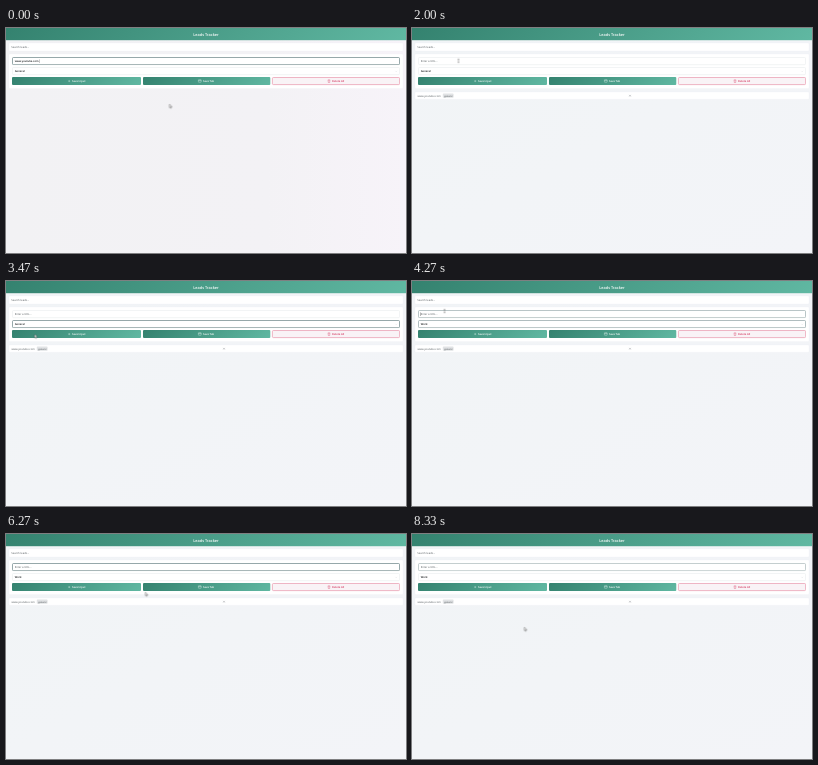
Write an HTML page that moves like this. It is 400 px wide and 225 px high and loops after 8.4 s.

```html
<!DOCTYPE html>
<html lang="en">
<head>
<meta charset="utf-8">
<title>Leads Tracker</title>
<style>
html, body { margin: 0; width: 100%; height: 100%; overflow: hidden; background: #f2f4f7; }
svg { display: block; width: 100%; height: 100%; }
text { font: 2.7px "Open Sans", "Noto Sans", sans-serif; fill: #43494d; text-rendering: geometricPrecision; }
.title { font-size: 3.85px; font-weight: 600; fill: #fff; text-anchor: middle; }
.hint { fill: #50575b; }
.value { font-size: 2.65px; font-weight: 600; fill: #14181a; }
.card { fill: #fff; stroke: #eceff1; stroke-width: .25; }
.field { fill: #fff; stroke: #dde2e5; stroke-width: .4; }
.focus { fill: none; stroke: #587578; stroke-width: .6; }
.btn text { font-size: 2.65px; font-weight: 600; fill: #fff; }
.btn path, .btn .icon { fill: none; stroke: #e9f8f3; stroke-width: .35; }
.del text { fill: #d2355d; }
.del path { stroke: #d2355d; }
.caret { stroke: #222; stroke-width: .35; }
.tip text { font-size: 2.25px; font-weight: 600; fill: #fff; text-anchor: middle; }

/* every timeline shares one loop */
.t { animation: 8.4s linear infinite; }
.step { animation-timing-function: step-end; }
.pink { animation-name: pink; }
.typed { animation-name: typed; }
.saved { animation-name: saved; }
.general { animation-name: general; }
.work { animation-name: work; }
.url-focus { animation-name: urlFocus; }
.cat-focus { animation-name: catFocus; }
.tip { animation-name: tip; }
.caret-end { animation-name: caretEnd; }
.caret-start { animation-name: caretStart; }
.arrow { animation-name: arrow; }
.hand { animation-name: hand; }
.beam { animation-name: beam; }
.cursor { animation-name: move; animation-timing-function: ease-in-out; }

@keyframes pink { 0%, 12% { opacity: 1 } 19%, 99.9% { opacity: 0 } 100% { opacity: 1 } }
@keyframes typed { 0% { opacity: 1 } 11.6%, 100% { opacity: 0 } }
@keyframes saved { 0% { opacity: 0 } 11.6%, 100% { opacity: 1 } }
@keyframes general { 0% { opacity: 1 } 44.8%, 100% { opacity: 0 } }
@keyframes work { 0% { opacity: 0 } 44.8%, 100% { opacity: 1 } }
@keyframes urlFocus {
  0%, 6% { opacity: 1 } 8.5%, 11% { opacity: .75 } 13%, 49% { opacity: 0 }
  52%, 95.5% { opacity: 1 } 99%, 99.9% { opacity: .5 } 100% { opacity: 1 }
}
@keyframes catFocus { 0%, 29.4% { opacity: 0 } 32.5%, 50% { opacity: 1 } 53%, 100% { opacity: 0 } }
@keyframes tip { 0%, 7% { opacity: 0 } 8.3%, 10.8% { opacity: 1 } 11.6%, 100% { opacity: 0 } }
@keyframes caretEnd { 0% { opacity: 1 } 6%, 100% { opacity: 0 } }
@keyframes caretStart { 0% { opacity: 0 } 50% { opacity: 1 } 55.6%, 100% { opacity: 0 } }
@keyframes arrow {
  0% { opacity: 1 } 6.7% { opacity: 0 } 12% { opacity: 1 } 23% { opacity: 0 }
  27% { opacity: 1 } 49.6% { opacity: 0 } 58% { opacity: 1 } 100% { opacity: 1 }
}
@keyframes hand { 0% { opacity: 0 } 6.7% { opacity: 1 } 12%, 100% { opacity: 0 } }
@keyframes beam {
  0% { opacity: 0 } 23% { opacity: 1 } 27% { opacity: 0 }
  49.6% { opacity: 1 } 58%, 100% { opacity: 0 }
}
@keyframes move {
  0%, .83% { transform: translate(163.4px, 76.3px) }
  8.4%, 11.1% { transform: translate(90.6px, 54.8px) }
  16.5%, 19% { transform: translate(88px, 99px) }
  23.8% { transform: translate(46.5px, 32.8px) }
  28.6%, 35.7% { transform: translate(42px, 43px) }
  41.3% { transform: translate(28.6px, 53.4px) }
  44.5%, 46.1% { transform: translate(27px, 58px) }
  50.8% { transform: translate(32.5px, 30px) }
  55.6%, 56.3% { transform: translate(34px, 33px) }
  65.8%, 69.9% { transform: translate(150px, 62px) }
  74.6% { transform: translate(139.3px, 58.3px) }
  77.7%, 82.5% { transform: translate(130px, 60px) }
  89.6%, 95.2% { transform: translate(125px, 64px) }
  99.17%, 99.99% { transform: translate(112.3px, 93.3px) }
  100% { transform: translate(163.4px, 76.3px) }
}
</style>
</head>
<body>
<svg viewBox="0 0 400 225" preserveAspectRatio="none">
  <defs>
    <linearGradient id="teal">
      <stop offset="0" stop-color="#34826f"/>
      <stop offset="1" stop-color="#60b8a2"/>
    </linearGradient>
    <!-- 45 degree sweeps across the bar and the buttons -->
    <linearGradient id="bar" href="#teal" gradientUnits="userSpaceOnUse" x1="97" y1="-97" x2="303" y2="109"/>
    <linearGradient id="fill" href="#teal" gradientUnits="userSpaceOnUse" x1="30.3" y1="-30.2" x2="98.7" y2="38.2"/>
    <linearGradient id="page" x2="1" y2="1">
      <stop offset="0" stop-color="#f1f4f6"/>
      <stop offset="1" stop-color="#f3f4f8"/>
    </linearGradient>
    <linearGradient id="blush">
      <stop offset="0" stop-color="#f2f2f4"/>
      <stop offset=".65" stop-color="#f3f2f5"/>
      <stop offset="1" stop-color="#f7f3f9"/>
    </linearGradient>
  </defs>

  <rect width="400" height="225" fill="url(#page)"/>
  <rect class="t pink" width="400" height="225" fill="url(#blush)"/>
  <rect width="400" height="12.2" fill="url(#bar)"/>
  <text class="title" x="200" y="7.7">Leads Tracker</text>

  <rect class="card" x="3" y="15" width="394" height="8" rx="1"/>
  <text class="hint" x="5.3" y="19.9">Search leads...</text>

  <rect class="card" x="3" y="26" width="394" height="34.5" rx="1"/>
  <rect class="field" x="6.5" y="29.5" width="387" height="7.2" rx="1"/>
  <rect class="field" x="6.5" y="39.5" width="387" height="7.2" rx="1"/>
  <rect class="focus t url-focus" x="6.5" y="29.5" width="387" height="7.2" rx="1"/>
  <rect class="focus t cat-focus" x="6.5" y="39.5" width="387" height="7.2" rx="1"/>

  <text class="value t step typed" x="8.7" y="34.1">www.youtube.com</text>
  <text class="hint t step saved" x="8.7" y="34.1">Enter a URL...</text>
  <path class="caret t step caret-end" d="M33.2 31.4v3.6"/>
  <path class="caret t step caret-start" d="M8.6 31.4v3.6"/>
  <text class="value t step general" x="8.7" y="44.2">General</text>
  <text class="value t step work" x="8.7" y="44.2">Work</text>
  <path d="M389.5 42.9l.7.7.7-.7" fill="none" stroke="#aeb4b8" stroke-width=".25"/>

  <g class="btn" transform="translate(6 49.1)">
    <rect width="129" height="7.9" rx="1" fill="url(#fill)"/>
    <path d="M56.2 4h2M57.2 3v2"/>
    <text x="60" y="4.9">Save Input</text>
  </g>
  <g class="btn" transform="translate(137 49.1)">
    <rect width="127.3" height="7.9" rx="1" fill="url(#fill)"/>
    <rect class="icon" x="55.4" y="2.6" width="2.8" height="2.5" rx=".3"/>
    <path d="M55.4 3.4h2.8"/>
    <text x="60" y="4.9">Save Tab</text>
  </g>
  <g class="btn del" transform="translate(266 49.1)">
    <rect x=".4" y=".4" width="127.2" height="7.1" rx="1" fill="#f9f3f6" stroke="#e0718d" stroke-width=".5"/>
    <path d="M55.8 3h2.4M56.1 3.1l.2 2.3h1.4l.2-2.3M56.6 2.6h.8"/>
    <text x="60" y="4.9">Delete All</text>
  </g>

  <g class="t step saved">
    <rect class="card" x="3" y="64" width="394" height="7.3" rx="1"/>
    <text x="5.4" y="68.7" class="hint">www.youtube.com</text>
    <rect x="30.8" y="65.6" width="10.8" height="4.2" rx=".8" fill="#e1e3e5"/>
    <text x="36.2" y="68.5" text-anchor="middle" style="font-size:2.35px">general</text>
    <path d="M217.2 66.9l1.6 1.6m0-1.6l-1.6 1.6" stroke="#6c7175" stroke-width=".35"/>
  </g>

  <g class="t tip">
    <rect x="53" y="44.1" width="35.3" height="5" rx=".7" fill="#101314"/>
    <text x="70.6" y="47.4">Save the URL entered above</text>
  </g>

  <g class="t cursor">
    <path class="t step arrow" d="M0 0v3.5l.9-.8.5 1.3.6-.3-.5-1.3h1.2z" fill="#fff" stroke="#333" stroke-width=".35"/>
    <path class="t step hand" d="M-.4.3q.4-.6.8 0v1.3l1.4.4q.5.2.4.8l-.4 1.4h-1.9l-1.5-1.8q.2-.6.8-.2l.4.3z" fill="#fff" stroke="#222" stroke-width=".35"/>
    <path class="t step beam" d="M-.7-1.7h1.4M0-1.7v3.4M-.7 1.7h1.4" fill="none" stroke="#444" stroke-width=".4"/>
  </g>
</svg>
</body>
</html>
```
